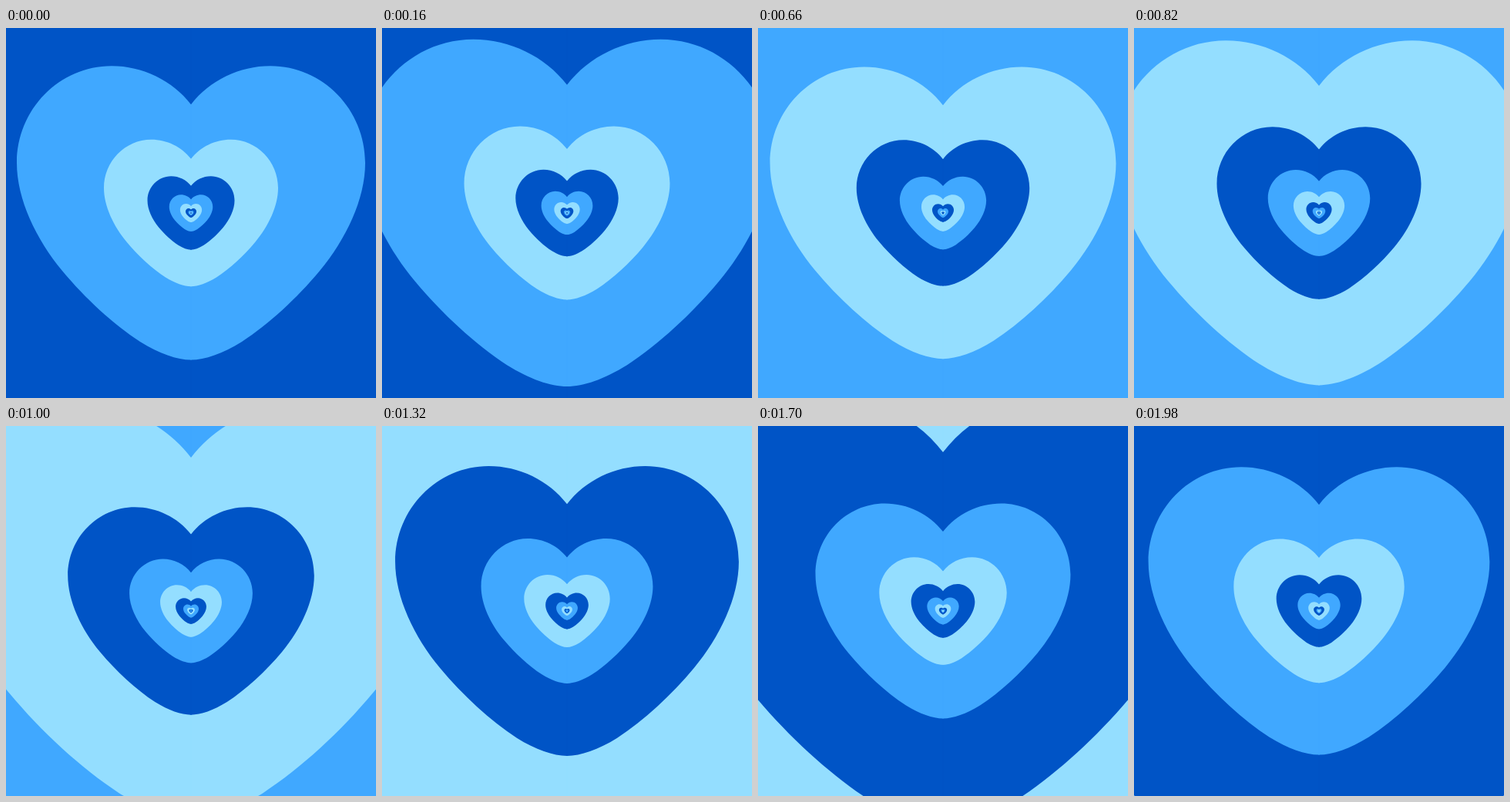
These frames come from a looping animation (480x480 px, 2 s). An HTML page with a canvas:

```html
<!DOCTYPE html>
<html>
<head>
<meta charset="utf-8">
<title>Endless hearts</title>
<style>
html, body { margin: 0; width: 100%; height: 100%; overflow: hidden; background: #0054c6; }
canvas { display: block; width: 100vmin; height: 100vmin; }
</style>
</head>
<body>
<canvas width="480" height="480"></canvas>
<script>
const ctx = document.querySelector('canvas').getContext('2d');
const LOOP = 2000, STEP = 20;
const COLORS = ['#40a8ff', '#94deff', '#0054c6'];

// Left half of the heart, from the notch to the tip, around the zoom centre
const half = new Path2D(`M0-140.7 C-24-172-63-190.7-103-190.7
  C-171-190.7-226-134-226-65 C-226-18-201 34-167 75
  C-137 111-101 144-66 167 C-41 182.5-18 190.5 0 190.5`);
const heart = new Path2D(half);
heart.addPath(half, new DOMMatrix([-1, 0, 0, 1, 0, 0]));

// Each heart is half the size of the one around it; one loop zooms by 2^3
function draw(time) {
  const zoom = Math.floor(time % LOOP / STEP) * STEP / LOOP * 3;
  const first = Math.floor(zoom) - 2;
  for (let k = first; k < first + 11; k++) {
    const scale = 2 ** (zoom - k);
    ctx.setTransform(scale, 0, 0, scale, 240, 240);
    ctx.fillStyle = COLORS[(k + 3) % 3];
    ctx.fill(heart);
    // Cover the antialiased seam between the two halves
    const seam = 0.6 / scale;
    ctx.fillRect(-seam, -140.7, seam * 2, 331.2);
  }
}

const start = performance.now();
function frame() {
  draw(performance.now() - start);
  requestAnimationFrame(frame);
}
frame();
</script>
</body>
</html>
```
